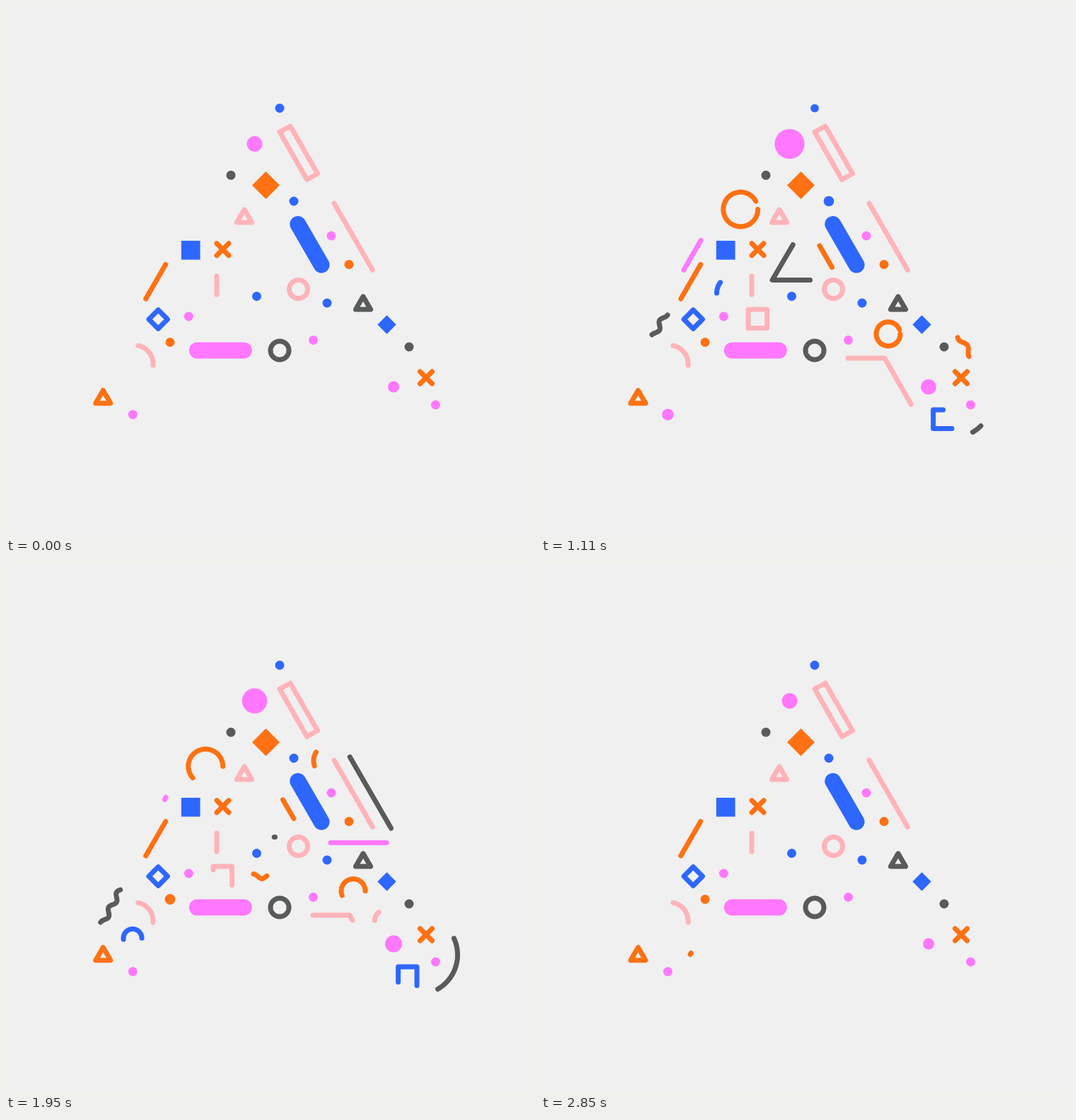
These frames come from a looping animation (748x748 px, 2.88 s). An HTML page with a canvas:

```html
<!DOCTYPE html>
<html lang="en">
<head>
<meta charset="utf-8">
<title>Letter A made of small shapes</title>
<style>
html, body { margin: 0; width: 100%; height: 100%; overflow: hidden; background: #f0f0f0; }
canvas { display: block; }
</style>
</head>
<body>
<canvas id="stage" width="748" height="748"></canvas>
<script>
const ctx = document.getElementById('stage').getContext('2d');
const LOOP = 2880, STEP = 30, TURN = 1110;
const BG = '#f0f0f0', BLUE = '#2e67ff', ORANGE = '#ff7112', MAGENTA = '#ff78ff',
      PINK = '#ffb3b8', DARK = '#595b5b';

// Timing
const linear = x => x;
const soft = x => x * (1.6 - .6 * x);
const easeOut = x => 1 - (1 - x) ** 3;
const progress = (t, from, to) => Math.min(1, Math.max(0, (t - from) / (to - from)));

// Paths: every builder returns a list of points, angles are in degrees
const polar = (x, y, r, deg) => {
  const a = deg * Math.PI / 180;
  return [x + r * Math.cos(a), y + r * Math.sin(a)];
};

const line = (x, y, deg, length) => [[x, y], polar(x, y, length, deg)];

function arc(x, y, r, from, to, step = 2) {
  const n = Math.ceil((to - from) / step);
  return Array.from({ length: n + 1 }, (_, i) => polar(x, y, r, from + (to - from) * i / n));
}

const polygon = (x, y, r, sides, turn = -90) => arc(x, y, r, turn, turn + 360, 360 / sides);

// A cosine wave that starts on a crest and swings to one side (1 right, -1 left)
function wave(x, y, deg, periods, period, side) {
  const n = periods * 24;
  return Array.from({ length: n + 1 }, (_, i) => {
    const [px, py] = polar(x, y, period * i / 24, deg);
    return polar(px, py, 3.3 * (1 - Math.cos(i * Math.PI / 12)), deg + 90 * side);
  });
}

// The part of a path between two fractions of its length
function slice(pts, from, to) {
  const sizes = pts.slice(1).map((p, i) => Math.hypot(p[0] - pts[i][0], p[1] - pts[i][1]));
  const total = sizes.reduce((a, b) => a + b);
  const out = [];
  let done = 0;
  sizes.forEach((size, i) => {
    const a = Math.max(0, (from * total - done) / size);
    const b = Math.min(1, (to * total - done) / size);
    const point = k => pts[i].map((v, j) => v + (pts[i + 1][j] - v) * k);
    if (a < b) {
      if (!out.length) out.push(point(a));
      out.push(point(b));
    }
    done += size;
  });
  return out;
}

// Drawing
function trace(pts) {
  ctx.beginPath();
  pts.forEach(p => ctx.lineTo(...p));
}

function stroke(color, pts, closed = false, width = 7) {
  ctx.strokeStyle = color;
  ctx.lineWidth = width;
  trace(pts);
  if (closed) ctx.closePath();
  ctx.stroke();
}

function fill(color, pts) {
  ctx.fillStyle = color;
  trace(pts);
  ctx.fill();
}

function dot(color, x, y, r = 6.5) {
  ctx.fillStyle = color;
  ctx.beginPath();
  ctx.arc(x, y, r, 0, 2 * Math.PI);
  ctx.fill();
}

const ring = (color, x, y) => stroke(color, arc(x, y, 13, 0, 360), true);
const triangle = (color, x, y) => stroke(color, polygon(x, y, 12.2, 3), true);

function cross(x, y) {
  for (const deg of [45, 135]) stroke(ORANGE, [polar(x, y, 12, deg), polar(x, y, -12, deg)]);
}

// Strokes whose head draws and whose tail wipes, each over [from, to]
const trims = [];
function trim(color, pts, head, tail, { repeat = 0, ease = linear } = {}) {
  trims.push({ color, pts, head, tail, ease, shifts: repeat ? [0, repeat] : [0] });
}

// Outline of the letter, its corners rounded by the same radius
const CORNER = 56;
trim(ORANGE, [[279, 245.5], ...arc(374.5, 191.5, CORNER, 210, 253)],
  [0, 330], [400, 790], { repeat: TURN });
trim(PINK, [[242, 533], ...arc(166, 554, CORNER, 30, 211)],
  [0, 280], [270, 755], { repeat: TURN });
trim(DARK, line(418, 156, 60, 253), [300, 560], [600, 1045], { repeat: TURN });
trim(DARK, arc(582.5, 554, CORNER, -31, 60),
  [540, 800], [815, 1167], { repeat: TURN, ease: easeOut });
trim(PINK, [[434, 498], [486, 498], [534, 582]], [760, 1170], [1125, 1560], { repeat: 1024 });
trim(ORANGE, line(239, 505, 120, 56), [1150, 1430], [1405, 1755], { repeat: TURN });

// Circles and squares
trim(ORANGE, arc(282.2, 287.5, 24.4, 0, 360), [90, 1300], [1420, 2805], { ease: soft });
trim(ORANGE, arc(491, 463.7, 17, 0, 360), [150, 1250], [1325, 2750], { ease: soft });
trim(BLUE, arc(179, 530.5, 13, 0, 360), [1120, 1640], [1715, 2205]);
trim(PINK, polygon(306.3, 442.3, 18.7, 4, 45), [0, 1080], [1298, 2735], { ease: easeOut });
trim(BLUE, polygon(567.8, 584.3, 18.7, 4, 45), [370, 1540], [1570, 2850]);

// Lines
trim(DARK, [[375, 305.5], [327, 387.5], [380.5, 387.5]], [0, 353], [827, 1960]);
trim(MAGENTA, line(198, 380, -60, 56), [186, 889], [963, 2015]);
trim(MAGENTA, line(545, 395.5, 180, 86), [1360, 1890], [1900, 2530]);
trim(ORANGE, line(411.5, 369.5, -120, 40), [605, 1179], [1720, 2700]);

// Short arcs
trim(ORANGE, arc(457.5, 279.5, 22.5, 161, 285), [1612, 2430], [2260, 2845]);
trim(BLUE, arc(273.5, 406, 25, 180, 270), [850, 1480], [1370, 1855]);
trim(PINK, arc(537, 506, 15.7, 183, 297), [1800, 2150], [2200, 2600]);

// Waves
trim(ORANGE, wave(558.2, 408, 58, 3.5, 28.3, 1), [237, 786], [790, 1255]);
trim(DARK, wave(179, 437, 118, 3.5, 24, 1), [820, 1515], [1720, 2358]);
trim(ORANGE, wave(350, 439.8, 0, 1.5, 24, 1), [1740, 2140], [2230, 2640]);

// A dot that goes evenly from one radius to another and back
function pulse(t, color, x, y, small, big, from, peak, to) {
  const k = Math.min(progress(t, from, peak), 1 - progress(t, peak, to));
  dot(color, x, y, small + (big - small) * k);
}

function drawPulses(t) {
  pulse(t, MAGENTA, 351.5, 195, 11, 23.3, 0, 1350, 2700);
  pulse(t, MAGENTA, 548, 538.5, 8, 13.1, 360, 1720, 2800);
  pulse(t, MAGENTA, 179.3, 577.7, 6.5, 9, 0, 750, 1950);
  pulse(t, BLUE, 407, 276, 6.5, 7.7, 270, 800, 1800);
  pulse(t, BLUE, 387, 144.5, 6.5, 5.4, 240, 740, 1650);
  pulse(t, ORANGE, 232, 475.5, 6.5, 8.2, 1650, 2170, 2690);
}

function drawFixed() {
  stroke(PINK, [[387, 178], [402, 170], [440.5, 237], [425.5, 245.5]], true);
  fill(ORANGE, polygon(367.5, 253.5, 19.5, 4));
  fill(BLUE, polygon(538.5, 450.5, 13.2, 4));
  fill(BLUE, polygon(261.2, 345.3, 18.9, 4, 45));
  stroke(BLUE, polygon(215.2, 443, 13.2, 4), true);

  triangle(PINK, 337, 300);
  triangle(DARK, 505, 423);
  triangle(ORANGE, 137.3, 555.7);
  cross(306.5, 344.3);
  cross(594, 525.5);
  ring(PINK, 413.5, 400.5);
  ring(DARK, 387, 487);

  stroke(ORANGE, line(225.7, 365.5, 120, 56));
  stroke(PINK, line(464, 279, 60, 108.7));
  stroke(PINK, line(298, 382, 90, 26));
  stroke(PINK, arc(181.8, 506, 26.2, -79, 4.5));
  stroke(BLUE, line(412.8, 308.5, 60, 66.5), false, 23);
  stroke(MAGENTA, line(270.3, 487, 0, 66), false, 23);

  dot(DARK, 318, 239.3);
  dot(DARK, 570, 482);
  dot(MAGENTA, 460, 325);
  dot(MAGENTA, 434.5, 472.5);
  dot(MAGENTA, 258.3, 439);
  dot(MAGENTA, 607.5, 564);
  dot(ORANGE, 485, 365.5);
  dot(BLUE, 354.5, 410.5);
  dot(BLUE, 454, 420);
}

function drawTrims(t) {
  for (const { color, pts, head, tail, ease, shifts } of trims) {
    for (const shift of shifts) {
      const from = progress(t - shift, ...tail);
      const to = ease(progress(t - shift, ...head));
      if (to - from > .002) stroke(color, slice(pts, from, to));
    }
  }
}

function draw(t) {
  ctx.fillStyle = BG;
  ctx.fillRect(0, 0, 748, 748);
  ctx.lineCap = ctx.lineJoin = 'round';
  drawFixed();
  drawPulses(t);
  drawTrims(t);
}

const start = performance.now();
function tick(now) {
  const t = Math.max(0, now - start) % LOOP;
  draw(Math.floor(t / STEP) * STEP);
  requestAnimationFrame(tick);
}
draw(0);
requestAnimationFrame(tick);
</script>
</body>
</html>
```
